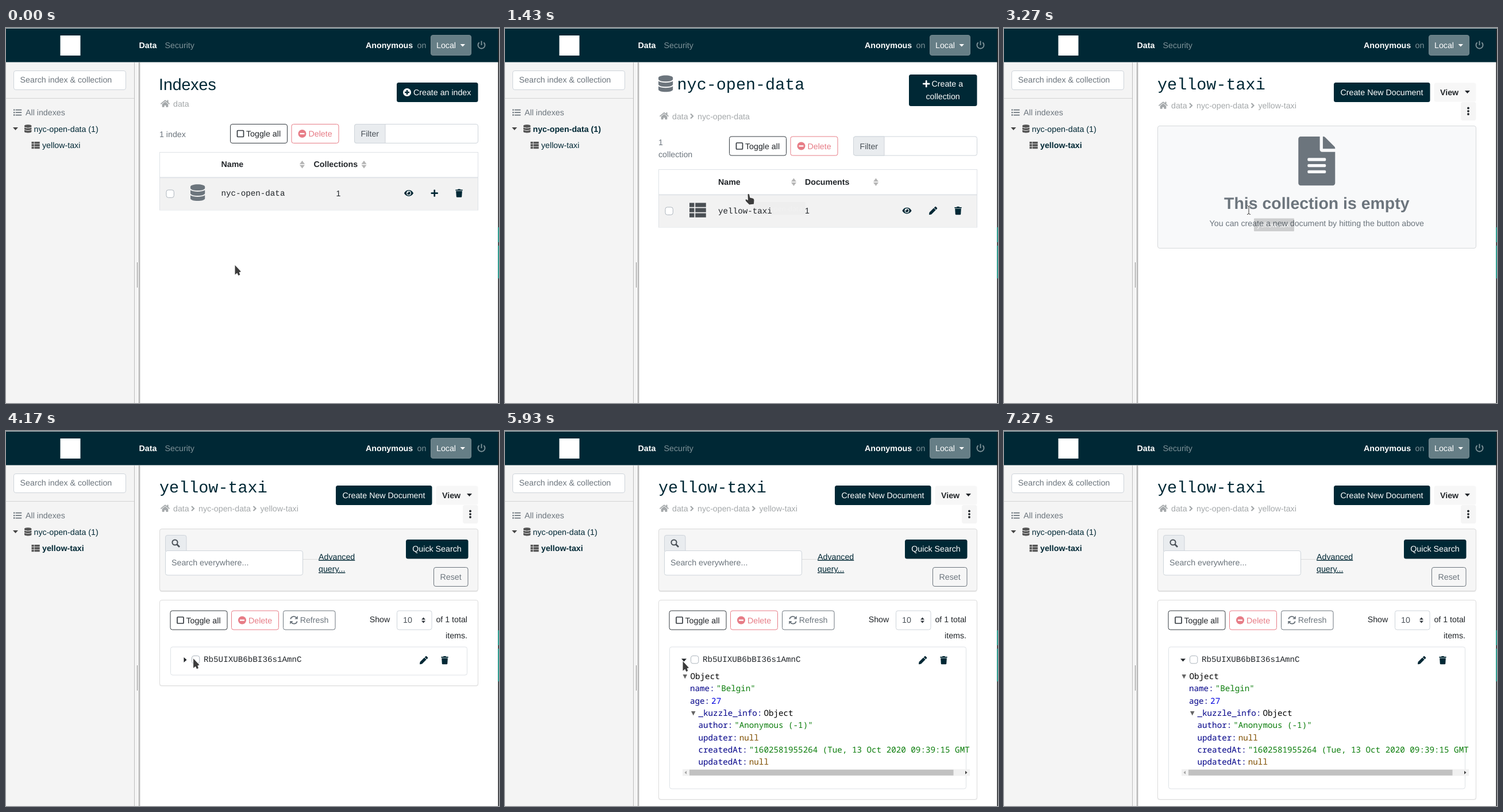
These frames come from a looping animation (858 by 653 pixels, 7460 ms). An HTML page:

```html
<!DOCTYPE html>
<html lang="en">
<head>
<meta charset="utf-8">
<title>Data console</title>
<style>
  html, body { margin: 0; width: 100%; height: 100%; overflow: hidden; background: #fff; }
  svg { display: block; width: 100%; height: 100%; }
  text {
    font: 14.22px "Liberation Sans", Arial, sans-serif;
    white-space: pre;
    text-rendering: geometricPrecision;
  }
  .b { font-weight: bold; }
  .m { font-family: "Liberation Mono", "Courier New", monospace; }
  .j { font-family: "Noto Sans Mono", "DejaVu Sans Mono", monospace; }
  .h { font-size: 28.44px; }
  .tip { font: 12px "Open Sans", "Noto Sans", sans-serif; }
  .u { text-decoration: underline; }
</style>
</head>
<body>
<svg id="stage" viewBox="0 0 858 653" preserveAspectRatio="none"></svg>
<script>
const LOOP = 7460;
const NAVY = '#002835', GREY = '#6c757d', INK = '#212529', PALE = '#a4a8aa',
      RED = '#e77c86', LINE = '#dee2e6', FIELD = '#ced4da', DIM = '#7f9399';

// Icon outlines on a 512 unit high grid
const bar = (x, y, w, h) => `M${x} ${y}h${w}v${h}h${-w}z`;
const ICONS = {
  db: 'M448 73v46c0 40-100 73-224 73S0 159 0 119V73C0 33 100 0 224 0s224 33 224 73zM448 176v103c0 40-100 73-224 73S0 319 0 279V176c48 33 136 49 224 49s176-16 224-49zm0 160v103c0 40-100 73-224 73S0 479 0 439V336c48 33 136 49 224 49s176-16 224-49z',
  table: [32, 192, 352].map(y => bar(0, y, 150, 128) + bar(182, y, 330, 128)).join(''),
  list: [54, 214, 374].map(y => bar(0, y, 84, 84) + bar(132, y + 10, 380, 64)).join(''),
  eye: 'M572 241C518 136 411 64 288 64S58 136 3 241a32 32 0 0 0 0 30C58 376 165 448 288 448s230-72 284-177a32 32 0 0 0 0-30zM288 400a144 144 0 1 1 144-144 144 144 0 0 1-144 144zm0-240a95 95 0 0 0-25 4 48 48 0 0 1-67 67A96 96 0 1 0 288 160z',
  plus: 'M416 208H272V64c0-18-14-32-32-32h-32c-18 0-32 14-32 32v144H32c-18 0-32 14-32 32v32c0 18 14 32 32 32h144v144c0 18 14 32 32 32h32c18 0 32-14 32-32V304h144c18 0 32-14 32-32v-32c0-18-14-32-32-32z',
  trash: 'M432 32H312l-9-19A24 24 0 0 0 281 0H167a24 24 0 0 0-22 13L136 32H16A16 16 0 0 0 0 48v32a16 16 0 0 0 16 16h416a16 16 0 0 0 16-16V48a16 16 0 0 0-16-16zM53 467a48 48 0 0 0 48 45h246a48 48 0 0 0 48-45L416 128H32z',
  pencil: 'M498 142l-46 46c-5 5-12 5-17 0L324 77c-5-5-5-12 0-17l46-46c19-19 49-19 68 0l60 60c19 19 19 49 0 68zM284 100L22 362 0 484c-3 16 11 31 28 28l122-22 262-262c5-5 5-12 0-17L301 100c-5-5-12-5-17 0z',
  home: 'M280 148L96 300v164a16 16 0 0 0 16 16h112a16 16 0 0 0 16-16v-96h96v96a16 16 0 0 0 16 16h112a16 16 0 0 0 16-16V300L296 148a12 12 0 0 0-16 0zM572 252l-84-69V44a12 12 0 0 0-12-12h-56a12 12 0 0 0-12 12v73L319 43a48 48 0 0 0-61 0L4 252a12 12 0 0 0-1 17l25 31a12 12 0 0 0 17 1L280 107a12 12 0 0 1 16 0l235 194a12 12 0 0 0 17-2l25-31a12 12 0 0 0-1-16z',
  file: 'M224 136V0H24C11 0 0 11 0 24v464c0 13 11 24 24 24h336c13 0 24-11 24-24V160H248c-13 0-24-11-24-24zm64 236c0 7-5 12-12 12H108c-7 0-12-5-12-12v-8c0-7 5-12 12-12h168c7 0 12 5 12 12zm0-64c0 7-5 12-12 12H108c-7 0-12-5-12-12v-8c0-7 5-12 12-12h168c7 0 12 5 12 12zm0-72v8c0 7-5 12-12 12H108c-7 0-12-5-12-12v-8c0-7 5-12 12-12h168c7 0 12 5 12 12zm96-114v6H256V0h6c6 0 12 3 17 7l98 98c4 5 7 11 7 17z'
};

// Drawing helpers
const text = (x, y, s, fill = INK, cls = '', extra = '') =>
  `<text x="${x}" y="${y}" fill="${fill}" class="${cls}" ${extra}>${s}</text>`;
const box = (x, y, w, h, fill, stroke = 'none', r = 3.5, extra = '') =>
  `<rect x="${x}" y="${y}" width="${w}" height="${h}" rx="${r}" fill="${fill}" stroke="${stroke}" ${extra}/>`;
const path = (d, fill, extra = '') => `<path d="${d}" fill="${fill}" ${extra}/>`;
const stroke = (d, color, w) => path(d, 'none', `stroke="${color}" stroke-width="${w}"`);
const icon = (name, x, y, h = 14.2, fill = NAVY) =>
  path(ICONS[name], fill, `fill-rule="evenodd" transform="translate(${x} ${y}) scale(${h / 512})"`);
const down = (x, y, w, h, fill) => path(`M${x} ${y}h${w}l${-w / 2} ${h}z`, fill);
const group = (id, body, extra = '') => `<g id="${id}" ${extra}>${body}</g>`;
const check = (x, y) => box(x, y, 13.3, 13.3, '#fff', '#adb5bd');
const sorter = (x, y) => path(`M${x} ${y + 6}l4.5-6 4.5 6z`, '#b5b5b5') + down(x, y + 7.5, 9, 6, '#b5b5b5');
const roundIcon = (cx, cy, fill, bg, plus) =>
  `<circle cx="${cx}" cy="${cy}" r="7" fill="${fill}"/>` +
  stroke(`M${cx - 4} ${cy}h8` + (plus ? `M${cx} ${cy - 4}v8` : ''), bg, 2.4);

const toggleAndDelete = (x, y) =>
  box(x + .5, y + .5, 99, 33, '#fff', '#343a40') +
  box(x + 12.5, y + 11.5, 11, 11, 'none', '#343a40', 1, 'stroke-width="1.7"') +
  text(x + 28, y + 22, 'Toggle all') +
  box(x + 107, y + .5, 82, 33, '#fff', RED) +
  roundIcon(x + 125.5, y + 17, RED, '#fff') +
  text(x + 136.5, y + 22, 'Delete', RED);

const filter = y =>
  box(606.5, y + .5, 215, 33, '#fff', FIELD) +
  path(`M610 ${y + .5}h50v33h-50a3.5 3.5 0 0 1-3.5-3.5v-26a3.5 3.5 0 0 1 3.5-3.5z`, '#e9ecef', `stroke="${FIELD}"`) +
  text(617.5, y + 22, 'Filter', '#495057');

const table = y =>
  box(267.5, y + .5, 554, 100.5, '#fff', LINE, 0) +
  box(268, y + 45, 553, 55.5, '#f2f2f2', 'none', 0) +
  box(267, y + 43.5, 555, 1.8, LINE, 'none', 0) +
  check(279, y + 66);

const crumbs = (y, ...names) => {
  const at = [291, 335, 442.5];
  return icon('home', 269, y - 12.5, 14.2, PALE) + names.map((s, i) =>
    (i ? stroke(`M${at[i] - 12} ${y - 9}l4 4-4 4`, PALE, 2.2) : '') + text(at[i], y, s, PALE)).join('');
};

// Frame of the application
const chrome =
  box(0, 0, 858, 653, '#fff', 'none', 0) +
  box(0, 60, 223, 593, '#f4f4f4', 'none', 0) +
  box(223, 60, 1, 593, '#bdbdbd', 'none', 0) +
  box(224, 60, 7, 593, '#f5f5f5', 'none', 0) +
  box(231, 60, 1.6, 593, '#a0a0a0', 'none', 0) +
  box(232.6, 60, 1.4, 593, '#dcdcdc', 'none', 0) +
  box(228, 408, 1, 44, '#8c8c8c', 'none', 0) +
  box(0, 0, 858, 59.5, NAVY, 'none', 0) +
  box(0, 0, 858, 1, '#b9c2c5', 'none', 0) +
  box(856.4, 1, 1.6, 652, '#26292b', 'none', 0) +
  box(856, 347, 2, 26, '#2f9c8f', 'none', 0) +
  box(856, 379, 2, 57, '#2f9c8f', 'none', 0) +
  box(94.5, 13, 35, 35, '#fff', 'none', 0) +
  text(231.5, 35, 'Data', '#fff', 'b') + text(276.5, 35, 'Security', DIM) +
  text(626, 35, 'Anonymous', '#fff', 'b') + text(715.5, 35, 'on', DIM) +
  box(739.5, 12.5, 70, 35, '#667e86', '#75898f') +
  text(749, 35, 'Local', '#fff') + down(790.5, 28, 8.5, 4.5, '#fff') +
  stroke('M823.6 25.2a6 6 0 1 0 7.8 0M827.5 22.5v7.5', DIM, 1.9) +
  box(13.5, 74.5, 195, 33, '#fff', FIELD) +
  text(24.6, 95, 'Search index &amp; collection', GREY) +
  box(0, 122, 223, 1, '#d4d4d4', 'none', 0) +
  icon('list', 13, 140, 14.2, GREY) + text(34, 152, 'All indexes', GREY) +
  down(12, 173, 9, 5, '#444') + icon('db', 32, 168.3, 14.2, '#555') +
  icon('table', 44.5, 197, 14.2, '#555') +
  text(48.5, 181, 'nyc-open-data (1)', NAVY, '', 'id="navIndex"') +
  text(63, 209, 'yellow-taxi', NAVY, '', 'id="navTable"');

const indexes =
  text(266, 108, 'Indexes', NAVY, 'h') + crumbs(137, 'data') +
  box(680, 95, 141.5, 34, NAVY) + roundIcon(698, 112, '#fff', NAVY, true) +
  text(709, 117, 'Create an index', '#fff') +
  text(267, 190, '1 index', GREY) + toggleAndDelete(390, 167) + filter(167) + table(216) +
  text(374.5, 242, 'Name', INK, 'b') + sorter(511, 231) +
  text(535.5, 242, 'Collections', INK, 'b') + sorter(618.5, 231) +
  icon('db', 321, 272.3, 28.8, GREY) +
  text(374.5, 292, 'nyc-open-data', INK, 'm', 'id="linkIndex"') + text(574.5, 293, '1') +
  icon('eye', 693, 280.5) + icon('plus', 739.5, 280.5) + icon('trash', 782.3, 280.5);

const collections =
  icon('db', 267, 82.5, 28.8, GREY) + text(299.5, 107, 'nyc-open-data', NAVY, 'm h') +
  crumbs(158.5, 'data', 'nyc-open-data') +
  box(703, 81, 118.5, 55, NAVY) + icon('plus', 727, 90, 14.2, '#fff') +
  text(742.5, 102, 'Create a', '#fff') + text(732.5, 123.5, 'collection', '#fff') +
  text(267, 204, '1', GREY) + text(267, 225, 'collection', GREY) +
  toggleAndDelete(390, 188.5) + filter(188.5) + table(246) +
  text(371, 272.5, 'Name', INK, 'b') + sorter(498, 261.5) +
  text(522, 272.5, 'Documents', INK, 'b') + sorter(641, 261.5) +
  icon('table', 321, 302.7, 28.8, '#4a4f54') +
  text(371, 322.5, 'yellow-taxi', INK, 'm', 'id="linkTable"') + text(522, 323, '1') +
  icon('eye', 691.5, 311) + icon('pencil', 738, 311) + icon('trash', 782.3, 311);

const head =
  text(267, 107, 'yellow-taxi', NAVY, 'm h') + crumbs(140, 'data', 'nyc-open-data', 'yellow-taxi') +
  box(574, 95, 167.5, 34, NAVY) + text(585.5, 117, 'Create New Document', '#fff') +
  box(748.5, 95.5, 73, 33, '#f7f7f7') + text(759, 117, 'View', INK, 'b') + down(802, 109, 9, 5, INK) +
  box(795, 129, 26.5, 32, '#f5f5f5') +
  [139.5, 144.8, 150].map(y => `<circle cx="808" cy="${y}" r="1.9" fill="${INK}"/>`).join('');

const empty =
  box(267.5, 170.5, 554, 213, '#f8f9fa', '#d6d9db') + icon('file', 512.3, 189, 85.3, GREY) +
  text(544.3, 315, 'This collection is empty', GREY, 'b h', 'text-anchor="middle"') +
  text(544.3, 345, 'You can create a new document by hitting the button above', GREY, '', 'text-anchor="middle"');

// Document body: key, value, value colour
const row = (x, y, key, value, color) =>
  text(x, y, key + ':', '#000088', 'j') + text(x + (key.length + 1) * 8.53 + 3, y, value, color, 'j');
const GREEN = '#0b7d0b', BROWN = '#7f4f00';
const json =
  down(309.5, 424, 7.5, 7.5, '#666') + text(322.5, 432, 'Object', '#000', 'j') +
  row(322, 453.3, 'name', '"Belgin"', GREEN) + row(322, 474.6, 'age', '27', '#0000e0') +
  down(324, 488, 7.5, 7.5, '#666') + row(336.5, 496, '_kuzzle_info', 'Object', '#000') +
  row(336.5, 517.3, 'author', '"Anonymous (-1)"', GREEN) + row(336.5, 538.6, 'updater', 'null', BROWN) +
  row(336.5, 560, 'createdAt', '"1602581955264 (Tue, 13 Oct 2020 09:39:15 GMT', GREEN) +
  row(336.5, 581.3, 'updatedAt', 'null', BROWN) +
  box(309, 589, 500, 11.5, '#f1f1f1', 'none', 0) + box(321, 589.8, 459.5, 10, '#c1c1c1', 'none', 0) +
  path('M316 591.8v6l-3.5-3z', '#a3a3a3') + path('M801 591.8v6l3.5-3z', '#404040');

const results =
  box(267.5, 171.5, 554, 108.5, '#e4e4e4') + box(267.5, 170.5, 554, 108, '#f6f6f6', '#dadada') +
  box(277.5, 181.5, 36.5, 30, '#e9ecef', FIELD) +
  stroke('M297.5 197.5l4.5 4.5', '#495057', 2.6) +
  '<circle cx="294" cy="194" r="4.6" fill="none" stroke="#495057" stroke-width="2"/>' +
  box(517, 223, 27, 1, '#dcdcdc', 'none', 0) + box(277.5, 208.5, 239, 42.5, '#fff', FIELD) +
  text(288, 234, 'Search everywhere...', GREY) +
  text(544, 223.5, 'Advanced', NAVY, 'u') + text(544, 245, 'query...', NAVY, 'u') +
  box(696, 189, 108.5, 33.5, NAVY) + text(707.3, 210, 'Quick Search', '#fff') +
  box(744.5, 237.5, 59.5, 33, 'none', GREY) + text(755.5, 258.5, 'Reset', GREY) +
  box(267, 295.5, 555, 150, '#ececec', 'none', 3.5, 'id="shade"') +
  box(267.5, 294.5, 554, 149, '#fff', '#dcdcdc', 3.5, 'id="card"') +
  toggleAndDelete(285.5, 312.5) +
  box(482.5, 313, 90.5, 33, '#fff', GREY) +
  stroke('M495.3 327.5a5.6 5.6 0 0 1 10-2.3M506.700 331.500a5.600 5.600 0 0 1-10 1.700', GREY, 1.9) +
  path('M507.800 322v5.500h-5.500zM494.200 336.500v-5.500h5.500z', GREY) +
  text(511.7, 334, 'Refresh', GREY) + text(632.7, 333, 'Show') +
  box(680.5, 313, 60.5, 33, '#fff', FIELD) + text(691, 334, '10', '#495057') +
  path('M723 328.5l3.500-4 3.500 4z', '#343a40') + down(723, 330.5, 7, 4, '#343a40') +
  text(803, 333, 'of 1 total', INK, '', 'text-anchor="end"') +
  text(803, 361, 'items.', INK, '', 'text-anchor="end"') +
  box(286.5, 376, 516, 49, '#fff', LINE, 3.5, 'id="doc"') +
  path('', INK, 'id="caret"') + check(323.500, 391.5) +
  text(344, 402, 'Rb5UIXUB6bBI36s1AmnC', INK, 'm') +
  icon('pencil', 720, 392) + icon('trash', 757.3, 392) +
  group('json', json, 'clip-path="url(#fold)"');

const tip = (id, x, y, w, s) => group(id, box(x, y, w, 22.5, '#000', 'none', 1) +
  text(x + w / 2, y + 15.500, s, '#fff', 'tip', 'text-anchor="middle"'));

// Pointers, hotspot at the origin
const OUTLINE = 'stroke="#fff" stroke-width="1" stroke-linejoin="round" paint-order="stroke"';
const pointers =
  group('arrow', path('M.5 0V16.500L4.300 13.500L6.400 18L9.300 16.800L7.700 12.300L11 11.200Z', '#3c3c3c', OUTLINE)) +
  group('hand', path('M-1.500 .5Q.2-.8 1 .8L2.300 6.500L7.500 7.800Q9.600 8.500 9.500 11L9 17.500L1.200 18.600L-4.300 13Q-6.300 10.600-4.800 9.600Q-3.600 9.200-1 11.300Z', '#3c3c3c', OUTLINE)) +
  group('beam', stroke('M-3-7h6M-3 7h6M0-7v14', '#fff', 2.4) +
    stroke('M-3-7.500q2.500 0 3 1.500q.5-1.500 3-1.500M0-6v12M-3 7.500q2.500 0 3-1.500q.5 1.500 3 1.500', '#333', 1));

const stage = document.getElementById('stage');
stage.innerHTML =
  '<defs><clipPath id="fold"><rect id="foldBox" x="300" y="376" width="509" height="0"/></clipPath></defs>' +
  chrome + group('indexes', indexes) + group('collections', collections) + group('head', head) +
  group('empty', empty) + group('results', results) +
  tip('tipIndex', 432, 303, 91, 'nyc-open-data') + tip('tipTable', 435, 331.5, 70, 'yellow-taxi') +
  pointers;

const el = {};
stage.querySelectorAll('[id]').forEach(n => el[n.id] = n);
const show = (n, on) => n.setAttribute('display', on ? 'inline' : 'none');

// Timing helpers: the screen refreshes in n even steps from a to b
const steps = (t, a, b, n) =>
  t < a ? 0 : t >= b ? 1 : (Math.floor((t - a) / (b - a) * (n - 1)) + 1) / n;
const smooth = u => u * u * (3 - 2 * u);
const mix = (a, b, u) => a + (b - a) * u;
const along = (a, b, u) => [mix(a[0], b[0], u), mix(a[1], b[1], u)];

function pointer(t) {
  if (t < 430) {
    return ['arrow', ...along([398, 413], [423, 290], smooth(steps(t, 230, 430, 7)))];
  }
  if (t < 600) return ['hand', 423, 290];
  if (t < 2100) return ['hand', 424, 289];
  if (t < 3100) {
    const p = along([424, 289], [424, 317], smooth(steps(t, 2100, 2700, 9)));
    return [p[1] > 310 ? 'hand' : 'arrow', ...p];
  }
  if (t < 3270) return ['hand', 426, 317];
  if (t < 3400) return ['beam', 426, 317];
  if (t < 4430) {
    const u = steps(t, 3730, 4430, 10);
    return ['arrow', ...(u < .8
      ? along([426, 317], [307, 411], smooth(u / .8))
      : along([307, 411], [309, 396], (u - .8) / .2))];
  }
  if (t < 5930) return ['arrow', 309, 396];
  if (t < 6730) return ['arrow', 309, 401];
  if (t < 7270) {
    const left = 1 - Math.floor((t - 6730) / 54) / 10;
    return ['arrow', ...along([217, 269.500], [26, -4], 1 - left ** 1.5)];
  }
  return ['none', 0, 0];
}

function docBottom(t) {
  if (t >= 5330) return 623;
  if (t >= 5200) return 565;
  return mix(425, 500, steps(t, 4700, 5000, 5));
}

function draw(t) {
  const page = t < 1330 ? 0 : t < 3270 ? 1 : 2;
  const loaded = t >= 3400, open = t >= 4700;
  show(el.indexes, page === 0);
  show(el.collections, page === 1);
  show(el.head, page === 2);
  show(el.empty, page === 2 && !loaded);
  show(el.results, loaded);
  el.navIndex.setAttribute('class', page === 1 ? 'b' : '');
  el.navTable.setAttribute('class', page === 2 ? 'b' : '');

  const [kind, x, y] = pointer(t);
  el.linkIndex.setAttribute('class', t >= 430 ? 'm u' : 'm');
  el.linkTable.setAttribute('class', t >= 2100 && kind === 'hand' ? 'm u' : 'm');
  for (const k of ['arrow', 'hand', 'beam']) {
    show(el[k], k === kind);
    el[k].setAttribute('transform', `translate(${x.toFixed(1)} ${y.toFixed(1)})`);
  }

  const fade = (from, a, len) => Math.max(0, from * (1 - (t - a) / len));
  el.tipIndex.setAttribute('opacity', t < 1330 ? 0 : fade(.1, 1330, 115));
  el.tipTable.setAttribute('opacity', t < 3100 ? 0 : t < 3270 ? .3 : t < 3330 ? .17 : fade(.11, 3330, 180));

  const bottom = docBottom(t);
  el.doc.setAttribute('height', bottom - 376);
  el.card.setAttribute('height', bottom + 18.500 - 294.500);
  el.shade.setAttribute('height', bottom + 19.500 - 295.500);
  el.foldBox.setAttribute('height', bottom - 7 - 376);
  show(el.json, open);
  el.caret.setAttribute('d', open ? 'M307 396.500h9l-4.500 5z' : 'M309.500 394v9l5-4.500z');
}

const start = performance.now();
function tick() {
  draw((performance.now() - start) % LOOP);
  requestAnimationFrame(tick);
}
tick();
</script>
</body>
</html>
```
